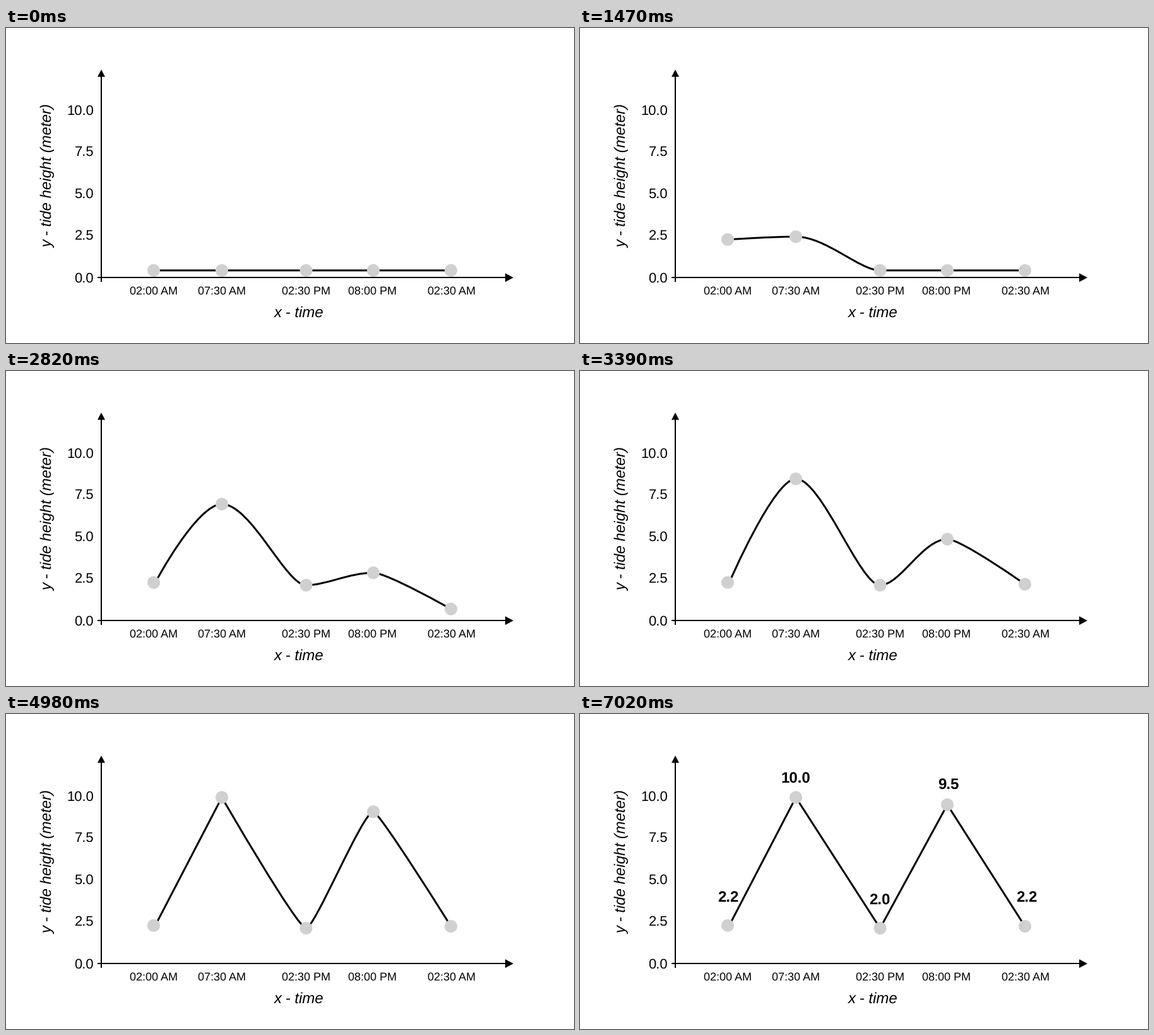
Write a matplotlib script that moves like this. It is 900x500 px and loops after 8.13 s.

```python
import matplotlib.pyplot as plt
import numpy as np
from matplotlib.animation import FuncAnimation
from matplotlib.patches import Circle, PathPatch, Polygon
from matplotlib.path import Path

plt.rcParams["font.family"] = "Liberation Sans"
plt.rcParams["text.hinting"] = "none"

FRAMES, INTERVAL = 271, 30
DPI = 100
PT = 72 / DPI  # points per pixel

DOT_X = np.array([234, 342, 475.5, 582, 705])
LINE_X = DOT_X + [2.5, 0, 0, 0, 0]
BASE_Y = 384.8
PEAK_Y = np.array([335.7, 132.4, 340, 144, 337])
START = np.array([8, 28.7, 49.4, 70.3, 91])
SPAN = np.array([25, 120, 25, 112.7, 25])
REACH_IN = np.array([0, 40, 32, 39, 0])
REACH_OUT = np.array([0, 47, 32, 22, 0])
FADE_START, FADE_SPAN = 209, 25

fig = plt.figure(figsize=(900 / DPI, 500 / DPI), dpi=DPI, facecolor="white")
ax = fig.add_axes([0, 0, 1, 1])
ax.set(xlim=(0, 900), ylim=(500, 0))
ax.axis("off")


def label(x, y, text, size, **style):
    style = {"ha": "center", "va": "baseline", "color": "black", **style}
    return ax.text(x, y, text, fontsize=size * PT, **style)


def draw_axes():
    ax.plot([144.5, 793], [396.2, 396.2], color="black", lw=2 * PT,
            solid_capstyle="butt")
    ax.plot([151, 151], [403, 76], color="black", lw=2 * PT,
            solid_capstyle="butt")
    ax.add_patch(Polygon([(791, 389.3), (804, 396.2), (791, 403.1)], fc="black", lw=0))
    ax.add_patch(Polygon([(145, 77.5), (151, 66), (157, 77.5)], fc="black", lw=0))

    for y, text in zip([138.1, 203.1, 269.6, 336, 403.6],
                       ["10.0", "7.5", "5.0", "2.5", "0.0"]):
        label(139, y, text, 22, ha="right")
    for x, text in zip([234, 342, 476, 581, 706],
                       ["02:00 AM", "07:30 AM", "02:30 PM", "08:00 PM", "02:30 AM"]):
        label(x, 423.2, text, 18)
    label(464, 459.2, "x - time", 24, style="italic")
    label(73.8, 235, "y - tide height (meter)", 24, style="italic",
          rotation=90, rotation_mode="anchor")


def bezier(s, a, b):
    return 3 * a * s * (1 - s) ** 2 + 3 * b * s ** 2 * (1 - s) + s ** 3


S = np.linspace(0, 1, 400)
EASE_T, EASE_V = bezier(S, 1 / 6, 2 / 3), bezier(S, 1 / 6, 1)


def progress(frame):
    return np.interp((frame - START) / SPAN, EASE_T, EASE_V)


def tangent_slopes(y):
    """Harmonic mean of neighbouring slopes, level at every turning point."""
    d = np.diff(y) / np.diff(LINE_X)
    left, right = d[:-1], d[1:]
    same = left * right > 1e-9
    mean = 2 * left * right / np.where(same, left + right, 1)
    return np.concatenate([[0], np.where(same, mean, 0), [0]])


def curve(y, p):
    # The handles shrink away as the peaks arrive, leaving straight lines.
    high, late = 1 - p[[1, 3]] ** 12
    softness = np.array([0, high, late, late, 0])
    direction = np.column_stack([np.ones(5), tangent_slopes(y)])
    handle_in = (softness * REACH_IN)[:, None] * direction
    handle_out = (softness * REACH_OUT)[:, None] * direction
    points = np.column_stack([LINE_X, y])
    verts = [points[0]]
    for i in range(len(points) - 1):
        verts += [points[i] + handle_out[i],
                  points[i + 1] - handle_in[i + 1], points[i + 1]]
    return Path(verts, [Path.MOVETO] + [Path.CURVE4] * (len(verts) - 1))


draw_axes()
line = PathPatch(curve(np.full(5, BASE_Y), np.zeros(5)), fc="none", ec="black",
                 lw=3 * PT, capstyle="butt", joinstyle="miter", zorder=3)
ax.add_patch(line)
dots = [ax.add_patch(Circle((x, BASE_Y), 10, fc="#d0d0d0", lw=0, zorder=4))
        for x in DOT_X]
values = [label(x, y, text, 24, weight="bold", alpha=0, zorder=5)
          for x, y, text in zip([234.5, 341.5, 474.5, 583.5, 707.5],
                                [298, 109.5, 302.3, 119.3, 298.2],
                                ["2.2", "10.0", "2.0", "9.5", "2.2"])]


def update(frame):
    p = progress(frame)
    y = BASE_Y + (PEAK_Y - BASE_Y) * p
    line.set_path(curve(y, p))
    for dot, x, dot_y in zip(dots, DOT_X, y):
        dot.center = x, dot_y
    alpha = float(np.clip((frame - FADE_START) / FADE_SPAN, 0, 1))
    for value in values:
        value.set_alpha(alpha)
    return [line, *dots, *values]


anim = FuncAnimation(fig, update, frames=FRAMES, interval=INTERVAL,
                     repeat=True, repeat_delay=0, blit=False)
plt.show()
```
